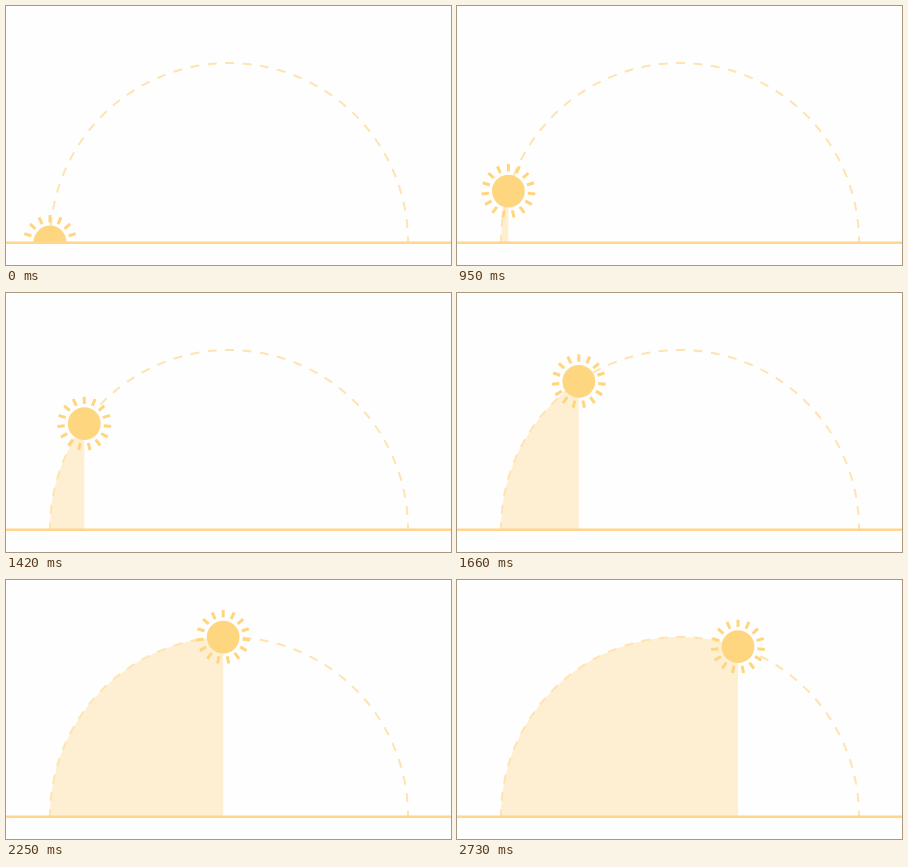
Recreate the animation shown at these times as an HTML page. Size 445 by 259 pixels, loop 3.81 s.

```html
<!DOCTYPE html>
<html lang="en">
<head>
<meta charset="utf-8">
<title>Sun path</title>
<style>
  html, body { margin: 0; width: 100%; height: 100%; overflow: hidden; background: #fefefe; }
  svg { display: block; width: 100vw; height: 100vh; }
</style>
</head>
<body>
<svg viewBox="0 0 445 259">
  <defs>
    <clipPath id="sky"><rect width="445" height="236.5"/></clipPath>
  </defs>
  <g clip-path="url(#sky)">
    <path id="area" fill="#feefd3"/>
    <path d="M44 236A179 179 0 0 1 402 236" fill="none" stroke="#ffe3b0" stroke-width="2"
          stroke-dasharray="9 8.46" stroke-dashoffset="2.2"/>
    <g id="sun">
      <circle r="16.4" fill="#ffd680"/>
      <path id="rays" stroke="#ffd680" stroke-width="3" fill="none"/>
    </g>
  </g>
  <rect y="235.5" width="445" height="2.5" fill="#ffd68c"/>
</svg>
<script>
const LOOP = 3810, CX = 223, HORIZON = 236, R = 179, RAYS = 15;
const FIRST = 3.5, STEP = 6.51, LAST = 108.9; // degrees along the arc
const TIMES = [720, 830, 950, 1070, 1190, 1310, 1430, 1550, 1660,
               1780, 1900, 2020, 2140, 2250, 2370, 2490, 2610, 2730];

const $ = id => document.getElementById(id);
const area = $('area'), sun = $('sun');

let rays = '';
for (let i = 0; i < RAYS; i++) {
  const a = i * 2 * Math.PI / RAYS, s = Math.sin(a), c = -Math.cos(a);
  rays += `M${19.6 * s} ${19.6 * c}L${27 * s} ${27 * c}`;
}
$('rays').setAttribute('d', rays);

function angleAt(t) {
  const n = TIMES.filter(time => time <= t).length;
  return n ? Math.min(FIRST + STEP * (n - 1), LAST) : 0;
}

function draw(t) {
  const a = angleAt(t) * Math.PI / 180;
  const x = CX - R * Math.cos(a), y = HORIZON - R * Math.sin(a);
  sun.setAttribute('transform', `translate(${x} ${y})`);
  area.setAttribute('d', `M${CX - R} ${HORIZON}A${R} ${R} 0 0 1 ${x} ${y}V${HORIZON}Z`);
}

const start = performance.now();
function tick() {
  draw((performance.now() - start) % LOOP);
  requestAnimationFrame(tick);
}
tick();
</script>
</body>
</html>
```
